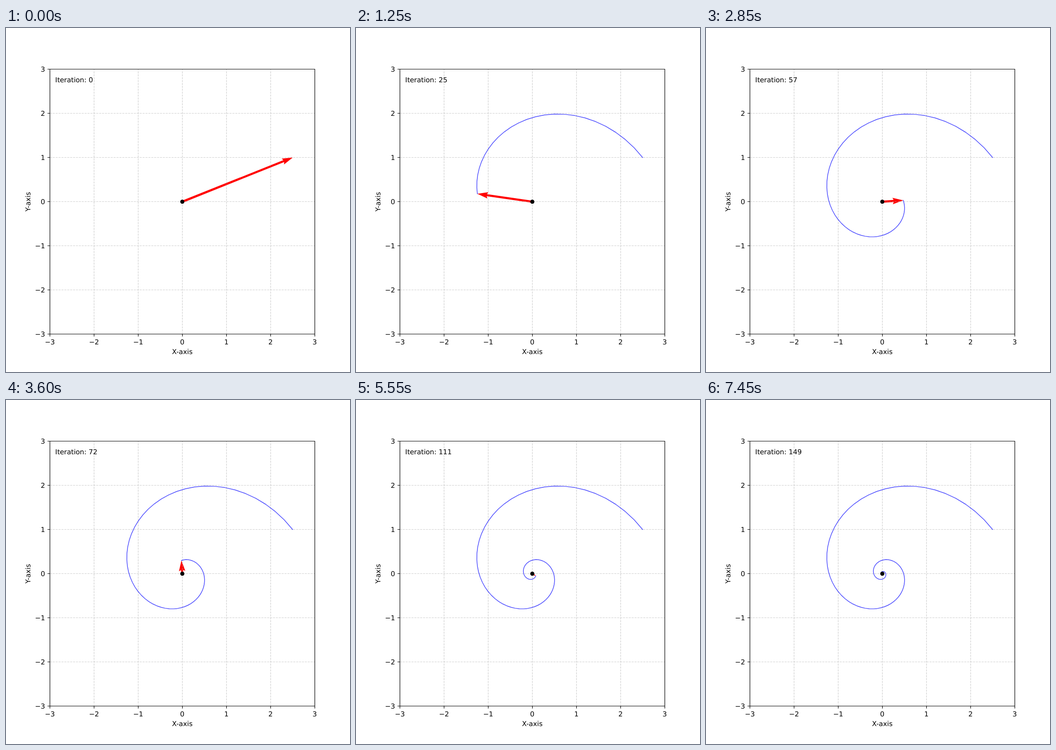
An HTML page for the animation above (7.5 s loop, 748x748 px).

```html
<!DOCTYPE html>
<html lang="en">
<head>
<meta charset="utf-8">
<title>Shrinking rotation</title>
<style>
  html, body { margin: 0; width: 100%; height: 100%; overflow: hidden; background: #fff; }
  svg { display: block; width: 748px; height: 748px; }
  text {
    font: 14.86px "DejaVu Sans", sans-serif;
    text-rendering: geometricPrecision;
    white-space: pre;
  }
  .mid { text-anchor: middle; }
  .end { text-anchor: end; }
  path { fill: none; }
  #arrow { fill: #f00; }
  #grid { stroke: #b0b0b0; stroke-opacity: .6; stroke-width: 1.19; stroke-dasharray: 4.4 1.9; }
  #frame { stroke: #000; stroke-width: 1.19; }
  #trail { stroke: #00f; stroke-opacity: .7; stroke-width: 1.486; stroke-linejoin: round; stroke-linecap: square; }
</style>
</head>
<body>
<svg viewBox="0 0 748 748">
  <path id="arrow"/>
  <path id="grid"/>
  <path id="trail"/>
  <circle cx="383.35" cy="377.74" r="4.46"/>
  <path id="frame"/>
  <g id="labels"></g>
  <text class="mid" x="383.35" y="709">X-axis</text>
  <text class="mid" transform="translate(53 377.74) rotate(-90)">Y-axis</text>
  <text id="counter" x="107" y="118"></text>
</svg>
<script>
const STEP = 50, COUNT = 150;
const CX = 383.35, CY = 377.74, UNIT = 95.993;
const SHRINK = 0.97, TURN = Math.PI / 30;
const SHAFT = 4.61, HEAD = 5, NOTCH = 4.5;

const $ = id => document.getElementById(id);
const snap = v => Math.floor(v) + 0.5;
const toPath = pts => "M" + pts.map(p => p.map(v => v.toFixed(2)).join(" ")).join("L");

function drawAxes() {
  let grid = "", frame = "M95.5 89.5H671.5V665.5H95.5Z", labels = "";
  for (let k = -3; k <= 3; k++) {
    const x = snap(CX + k * UNIT), y = snap(CY - k * UNIT);
    const name = String(k).replace("-", "\u2212");
    if (Math.abs(k) < 3) grid += `M${x} 665.7V89.8M95.4 ${y}H671.3`;
    frame += `M${x} 665.5V670.7M95.5 ${y}H90.3`;
    labels += `<text class="mid" x="${CX + k * UNIT}" y="688">${name}</text>`
            + `<text class="end" x="85" y="${y + 5.5}">${name}</text>`;
  }
  $("grid").setAttribute("d", grid);
  $("frame").setAttribute("d", frame);
  $("labels").innerHTML = labels;
}

const start = { r: Math.hypot(2.5, 1) * UNIT, a: Math.atan2(1, 2.5) };
const radius = n => start.r * SHRINK ** n;
const angle = n => start.a + TURN * n;
const tip = n => [CX + radius(n) * Math.cos(angle(n)), CY - radius(n) * Math.sin(angle(n))];

// Outline along the x axis, in shaft widths; short arrows shrink as a whole.
function outline(len) {
  if (len < 1) {
    return Array.from({ length: 6 }, (_, i) =>
      [Math.cos(i * Math.PI / 3) / 2, Math.sin(i * Math.PI / 3) / 2]);
  }
  const full = Math.max(len, HEAD), s = Math.min(1, len / HEAD);
  const half = [[0, .5], [full - NOTCH, .5], [full - HEAD, 1.5], [full, 0]];
  const mirror = half.slice(0, 3).reverse().map(([x, y]) => [x, -y]);
  return [...half, ...mirror].map(([x, y]) => [x * s, y * s]);
}

function arrowPath(n) {
  const c = Math.cos(angle(n)) * SHAFT, s = Math.sin(angle(n)) * SHAFT;
  const pts = outline(radius(n) / SHAFT)
    .map(([x, y]) => [CX + x * c - y * s, CY - x * s - y * c]);
  return toPath(pts) + "Z";
}

let shown = -1;
function draw(now) {
  const n = Math.floor(now / STEP) % COUNT;
  if (n !== shown) {
    shown = n;
    $("arrow").setAttribute("d", arrowPath(n));
    $("trail").setAttribute("d", n ? toPath(Array.from({ length: n + 1 }, (_, i) => tip(i))) : "");
    $("counter").textContent = "Iteration: " + n;
  }
}

drawAxes();
draw(0);
const began = performance.now();
function tick() {
  draw(performance.now() - began);
  requestAnimationFrame(tick);
}
requestAnimationFrame(tick);
</script>
</body>
</html>
```
